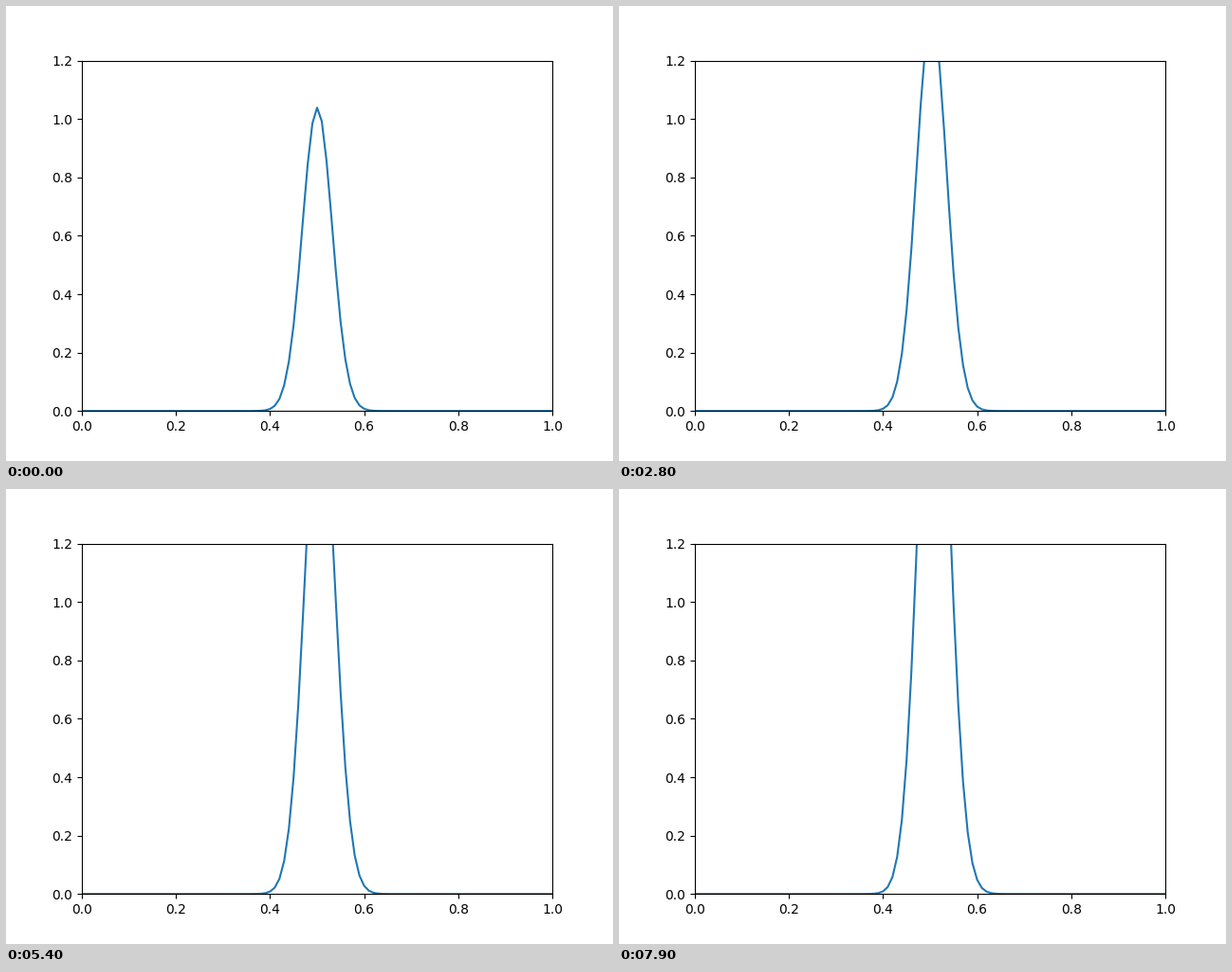
These frames come from a looping animation (640x480 px, 8 s). A matplotlib script:

```python
import numpy as np
import matplotlib.pyplot as plt
from matplotlib.animation import FuncAnimation

FRAMES = 80
INTERVAL = 100
START = 4      # steps already taken when the loop begins
RATE = 0.01    # share of the left neighbour added per step


def advance(u):
    """Sweep left to right, feeding each point from its updated neighbour."""
    u = u.copy()
    for i in range(1, len(u)):
        u[i] += RATE * u[i - 1]
    return u


x = np.linspace(0, 1, 101)
states = [np.exp(-500 * (x - 0.5) ** 2)]
for _ in range(START + FRAMES - 1):
    states.append(advance(states[-1]))

fig, ax = plt.subplots(figsize=(6.4, 4.8), dpi=100)
ax.set_xlim(0, 1)
ax.set_ylim(0, 1.2)
line, = ax.plot(x, states[START])


def update(frame):
    line.set_ydata(states[START + frame])
    return line,


anim = FuncAnimation(fig, update, frames=FRAMES, interval=INTERVAL,
                     repeat=True, repeat_delay=0)
plt.show()
```
